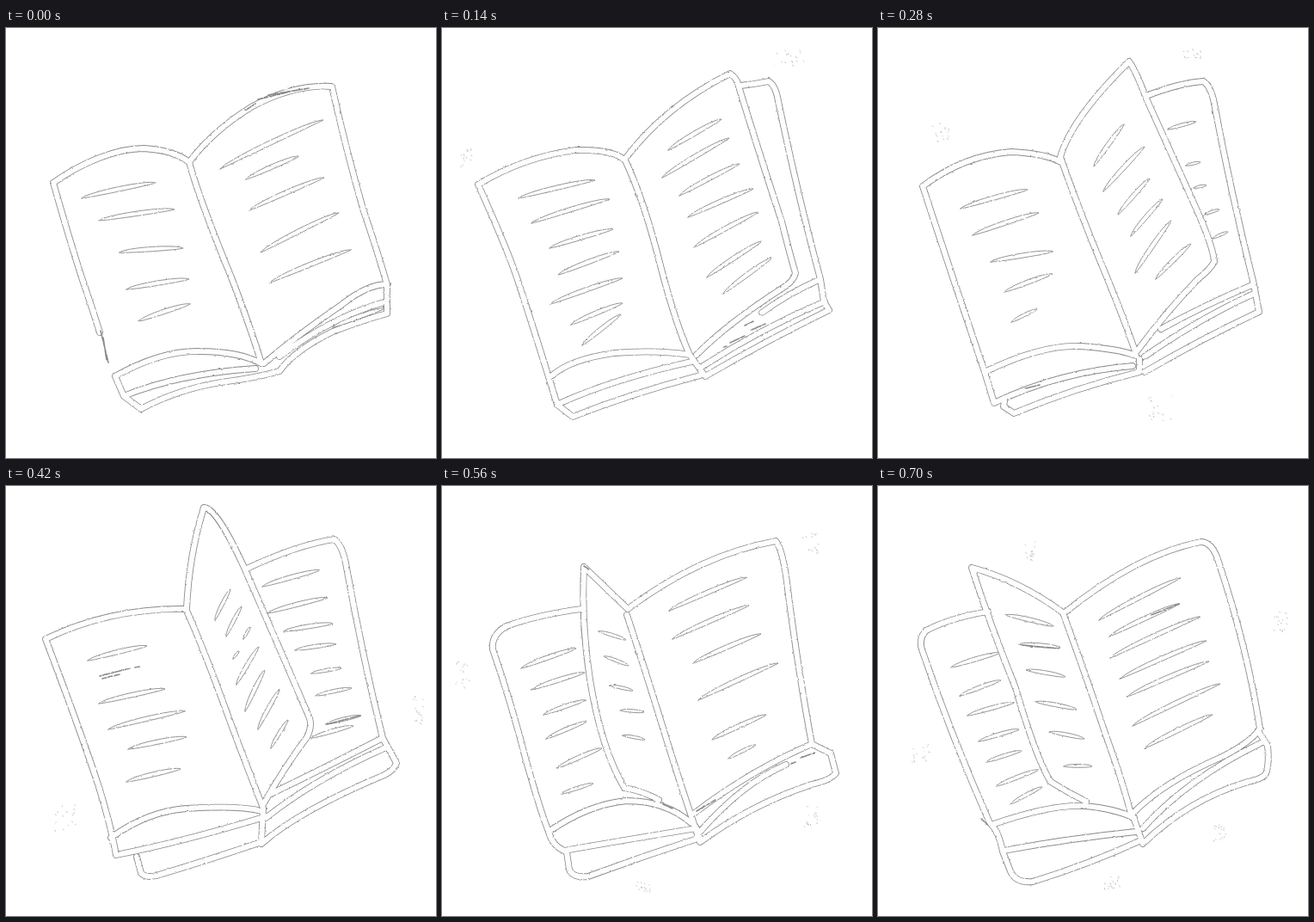
An HTML page that plays this animation: 500x500 px, repeating every 840 ms.

```html
<!DOCTYPE html>
<html lang="en">
<head>
<meta charset="utf-8">
<title>Turning pages</title>
<style>
  html, body { margin: 0; width: 100%; height: 100%; overflow: hidden; background: #fff; }
  svg { display: block; width: 100%; height: 100%; }
  path { fill: none; stroke-linecap: round; stroke-linejoin: round; }
  .edge { stroke: #8a8a8a; stroke-width: 7.8; }
  .core { stroke: #fdfdfd; stroke-width: 6.1; }
  .mark { fill: #fdfdfd; stroke: #8a8a8a; stroke-width: .9; }
  .ink { stroke: #8a8a8a; stroke-width: 1.6; stroke-dasharray: 7 1 4 2; }
  .speck { stroke: #bbb; stroke-width: .9; }
  .pose { visibility: hidden; animation: show 840ms step-end infinite; }
  @keyframes show {
    0% { visibility: visible; }
    16.6666%, 100% { visibility: hidden; }
  }
</style>
</head>
<body>
<svg id="stage" viewBox="0 0 500 500">
  <filter id="rough" filterUnits="userSpaceOnUse" x="0" y="0" width="500" height="500">
    <feTurbulence type="fractalNoise" baseFrequency=".3" numOctaves="2" seed="4"/>
    <feDisplacementMap in="SourceGraphic" scale="2.2" xChannelSelector="R" yChannelSelector="G"/>
  </filter>
</svg>
<script>
// book: outline strokes; marks: x1 y1 x2 y2 per text line; specks: x y width height per cluster
const poses = [
  {
    book: `M55 180C90 155 130 140 160 140Q195 142 213 156Q225 200 262 290Q285 350 297 390
      M55 180Q75 250 88 290Q101 328 109 354
      M213 156Q240 120 285 92Q335 65 379 68Q395 140 415 210Q432 260 443 298Q420 298 390 322Q340 356 300 390
      M127 405Q180 375 225 376Q270 376 297 390
      M127 405L137 428L157 443Q200 420 250 412Q290 407 318 399Q335 375 380 353Q420 338 443 332L443 298
      M137 428Q200 402 290 396M318 382Q380 335 443 318`,
    marks: `88 198 174 180 108 224 196 211 132 261 206 256 140 304 213 292 154 341 214 321
      249 164 369 107 279 176 341 149 283 212 370 174 296 261 387 215 307 296 401 258
      380 348 440 326`,
    ink: 'M110 352L119 389M113 360L117 386M278 96L290 88M293 83L330 74M305 78L352 70',
    specks: ''
  },
  {
    book: `M42 182Q95 150 155 142Q200 141 213 154Q235 200 255 280Q272 345 288 380
      M42 182Q75 255 87 290Q110 360 134 438L152 452Q220 425 300 404
      M213 152Q260 90 335 53Q343 58 345 68Q375 165 395 225Q405 265 411 285Q409 295 395 303Q330 345 296 380
      M347 67Q365 65 380 62Q388 67 391 85Q415 200 440 292Q400 310 372 331
      M440 292L444 318L450 328Q380 362 306 405L288 380
      M128 404Q150 385 200 378Q250 374 288 380
      M138 436Q200 408 290 388M302 394Q370 350 445 318`,
    marks: `89 198 178 177 104 227 195 199 125 256 199 234 135 287 206 260 126 321 210 291
      150 345 210 320 163 369 208 333 263 142 325 106 256 174 334 128 276 195 346 158
      286 220 362 187 293 255 368 214 308 290 372 248 327 309 384 267`,
    ink: 'M328 371L331 370M335 366L352 358M352 346L362 341M360 351L376 344',
    specks: '405 34 36 22 28 150 14 22'
  },
  {
    book: `M52 184Q100 148 155 144Q195 146 213 156
      M52 184Q85 285 124 400L135 436Q210 400 296 393
      M212 150Q235 215 260 275Q285 335 299 376
      M212 150Q225 105 292 39Q300 50 312 82Q345 155 370 210Q390 255 391 272Q385 282 372 292Q335 330 301 376
      M312 79Q350 64 378 62Q387 67 391 88Q410 190 437 298Q380 322 329 350
      M437 298L443 330Q375 362 310 400M437 309Q375 337 310 382
      M124 400Q190 368 235 370Q280 373 300 381
      M147 434L146 440L158 448Q230 418 304 400L304 385`,
    marks: `96 210 174 188 110 241 187 215 131 272 204 260 147 307 203 286 155 342 185 327
      251 161 286 112 262 190 310 138 279 217 316 175 294 242 331 199 299 285 341 224
      323 292 364 251 337 118 370 109 358 160 375 156 367 186 382 183 380 217 397 211
      389 245 407 237`,
    ink: 'M172 419L188 415',
    specks: '366 30 22 11 73 119 20 25 328 442 29 30'
  },
  {
    book: `M46 178Q120 142 208 143M46 178Q85 280 108 350Q122 395 128 429
      M210 142Q213 80 230 25Q245 25 277 95Q310 170 353 270Q356 280 350 292Q325 325 298 372
      M210 145Q228 185 250 245Q270 300 298 372
      M280 96Q340 68 382 62Q392 70 396 95Q415 200 438 293Q370 328 308 358
      M438 293L454 322Q452 330 440 336Q340 378 297 416L299 375
      M442 304Q360 340 302 386
      M122 409Q165 378 210 375Q270 371 298 378
      M128 429Q200 415 297 386M152 431L157 450Q162 456 175 453Q235 435 297 414`,
    marks: `95 203 164 186 108 253 185 236 119 283 208 262 142 306 210 292 140 344 203 329
      243 156 261 120 256 175 274 140 264 201 271 192 276 178 284 164 268 231 294 187
      278 262 301 214 293 283 318 237 308 305 328 272 298 117 365 98 304 148 374 130
      323 169 380 160 336 191 383 184 355 218 390 212 360 244 402 235 355 293 404 279
      372 277 413 267`,
    ink: 'M109 221L144 212M112 224L132 219M150 211L155 210M373 277L412 267',
    specks: '478 261 14 31 68 387 28 32'
  },
  {
    book: `M162 143Q110 150 75 163Q57 173 59 190Q80 250 98 320Q115 380 124 402Q128 418 142 424
      M216 143L165 94Q162 160 172 225Q185 305 212 351Q232 354 252 365
      M215 150Q235 210 255 275Q275 340 292 390
      M216 143Q300 80 388 64Q397 75 402 120Q415 220 430 300Q360 330 294 380
      M430 300L452 311L458 334Q452 342 430 347Q360 370 300 414L292 390
      M400 324Q350 345 300 402
      M124 402Q170 370 215 366Q260 366 290 392
      M142 424Q210 412 296 398M145 426L148 446Q152 456 170 454Q235 430 300 409`,
    marks: `92 212 156 189 104 237 166 217 118 266 167 249 121 294 168 274 134 328 186 305
      139 358 176 346 182 169 214 179 188 198 217 209 195 232 222 238 207 261 235 263
      210 290 236 295 264 145 355 106 268 178 357 139 292 206 371 172 298 249 391 206
      314 295 377 266 333 317 365 301`,
    ink: 'M165 93L171 97M257 370L268 375M296 378L318 365M406 323L411 321M417 316L434 310',
    specks: '428 66 20 26 24 219 16 32 430 384 18 24 234 467 20 15'
  },
  {
    book: `M128 146Q85 153 56 168Q46 178 52 193Q85 290 130 392Q140 400 145 425
      M216 148Q165 110 109 95Q130 160 160 235Q185 320 201 344Q220 356 242 367
      M216 150Q245 230 265 290Q285 345 295 385
      M216 148Q300 80 375 65Q388 65 395 85Q430 190 444 282Q435 297 400 315Q330 345 295 382
      M444 288L453 302Q455 320 452 332Q450 340 430 344Q360 365 308 416L298 388
      M447 298Q360 340 308 398
      M132 394Q200 370 240 372Q275 375 298 386
      M146 424Q220 410 300 402M145 425L154 448Q160 462 180 460Q245 440 306 412`,
    marks: `85 211 142 194 95 244 143 226 104 267 158 252 117 297 164 283 126 321 167 308
      138 349 187 330 154 370 191 350 148 150 204 163 164 184 212 188 172 214 218 222
      183 251 231 260 199 286 240 294 216 326 249 326 257 156 352 107 269 175 351 137
      270 200 375 152 282 224 382 180 290 245 385 204 296 279 398 230 310 305 389 266`,
    ink: 'M120 387L128 394M168 185L210 189M318 150L350 137',
    specks: '176 75 13 22 468 158 16 26 49 310 20 22 397 404 14 20 272 461 18 16'
  }
];

const stage = document.getElementById('stage');

function add(parent, tag, attributes) {
  const node = document.createElementNS('http://www.w3.org/2000/svg', tag);
  for (const name in attributes) node.setAttribute(name, attributes[name]);
  return parent.appendChild(node);
}

function quads(text) {
  const values = text.split(/\s+/).filter(Boolean).map(Number);
  return Array.from({ length: values.length / 4 }, (_, i) => values.slice(i * 4, i * 4 + 4));
}

// A slightly bowed sliver that narrows at both ends
function sliver([x1, y1, x2, y2]) {
  const dx = x2 - x1, dy = y2 - y1, length = Math.hypot(dx, dy);
  const thick = Math.min(3.6, 1.5 + length / 30), bow = length * .025;
  const at = (along, side) =>
    `${x1 + dx * along + dy / length * side} ${y1 + dy * along - dx / length * side}`;
  return `M${x1} ${y1}C${at(.08, bow + thick)} ${at(.9, bow + thick)} ${x2} ${y2}` +
    `C${at(.95, bow - thick)} ${at(.1, bow - thick)} ${x1} ${y1}Z`;
}

let seed = 7;
function random() {
  seed = seed * 16807 % 2147483647;
  return seed / 2147483647;
}

function cluster([x, y, width, height]) {
  let d = '';
  for (let i = 0; i < 16; i++) {
    d += `M${x + (random() - .5) * width} ${y + (random() - .5) * height}l.6 ${random() * 1.5}`;
  }
  return d;
}

poses.forEach(({ book, marks, ink, specks }, i) => {
  const pose = add(stage, 'g', {
    class: 'pose', filter: 'url(#rough)', style: `animation-delay:${i * 140 - 840}ms`
  });
  const draw = (name, d) => add(pose, 'path', { class: name, d });
  draw('edge', book);
  draw('core', book);
  draw('mark', quads(marks).map(sliver).join(''));
  draw('ink', ink);
  draw('speck', quads(specks).map(cluster).join(''));
});
</script>
</body>
</html>
```
